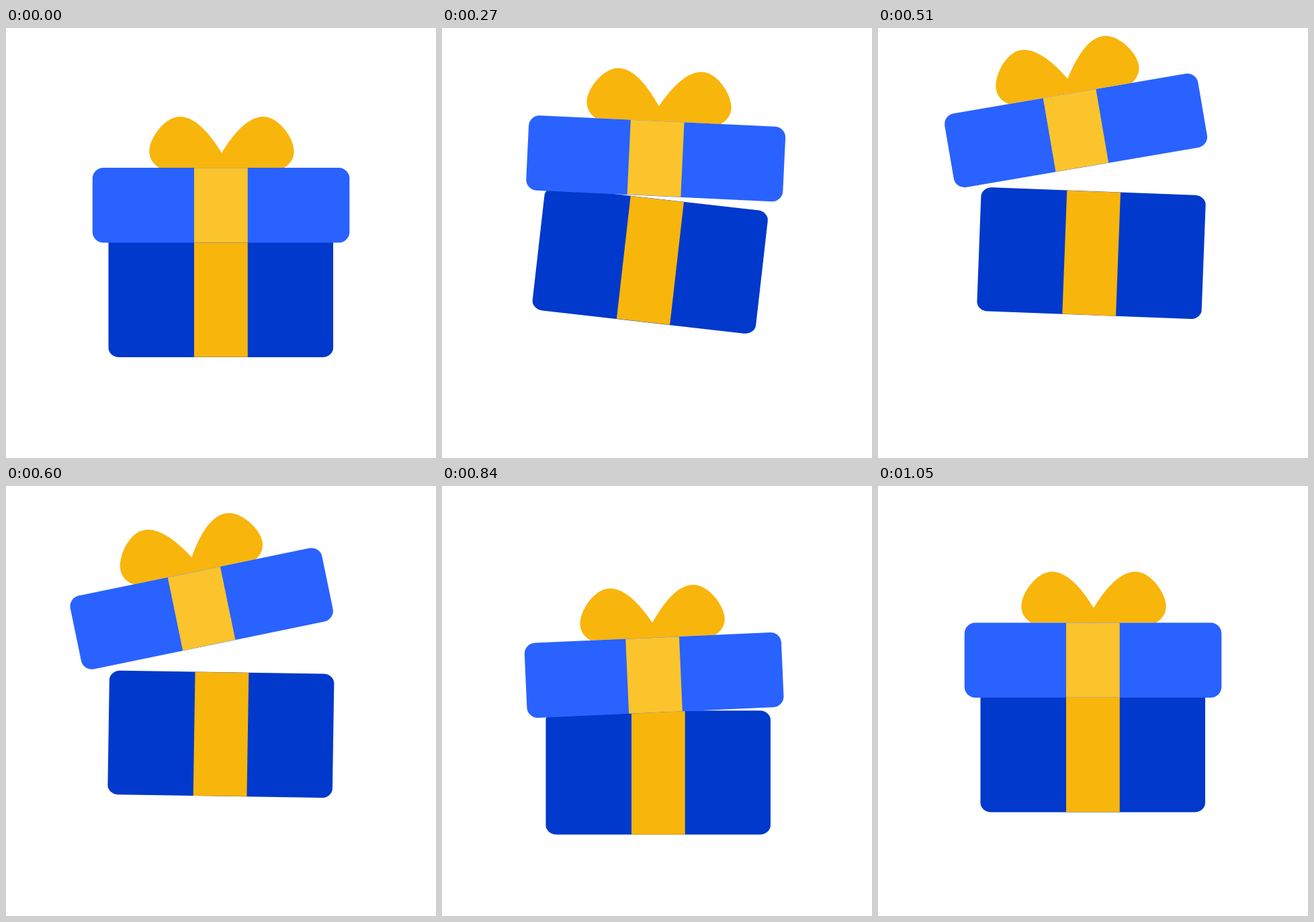
An HTML page with a canvas that plays this animation: 640 px wide and 640 px high, repeating every 2730 ms.

```html
<!DOCTYPE html>
<html lang="en">
<head>
<meta charset="utf-8">
<title>Gift box</title>
<style>
  html, body { margin: 0; width: 100%; height: 100%; overflow: hidden; background: #fff; }
  canvas { display: block; width: 640px; height: 640px; }
</style>
</head>
<body>
<canvas id="stage" width="640" height="640"></canvas>
<script>
const ctx = document.getElementById('stage').getContext('2d');
const LOOP = 2730, MOVE_END = 1050, STEP = 30;
const BLUE = '#2962ff', NAVY = '#0039cb', GOLD = '#f8b50c', PALE = '#fbc42d';

// Eased swing from one value to the next between two times.
// A skew above 1 makes the swing quick at first and slow at the end.
function swing(t, t0, t1, from, to, skew = 1) {
  const u = Math.min(1, Math.max(0, (t - t0) / (t1 - t0)));
  const s = 1 - (1 - u) ** skew;
  return from + (to - from) * s * s * (3 - 2 * s);
}

// The body hangs from the middle of its top edge.
function bodyPose(t) {
  return {
    x: t < 860 ? swing(t, 0, 860, 319.75, 321.75) : swing(t, 860, MOVE_END, 321.75, 319.75),
    y: t < 432 ? swing(t, 0, 432, 305.5, 230.5)
      : t < 798 ? swing(t, 432, 798, 230.5, 337)
      : swing(t, 798, MOVE_END, 337, 301),
    turn: t < 240 ? swing(t, 0, 240, 0, 6.6, 1.1) : swing(t, 240, 840, 6.6, 0, 1.6)
  };
}

// The lid turns about the middle of its bottom edge.
function lidPose(t) {
  return {
    x: t < 600 ? swing(t, 110, 600, 320, 302.4) : swing(t, 600, 900, 302.4, 320),
    y: t < 463 ? swing(t, 20, 463, 319.5, 202.7)
      : t < 885 ? swing(t, 463, 885, 202.7, 341.5)
      : swing(t, 885, MOVE_END, 341.5, 315),
    turn: t < 182 ? swing(t, 0, 182, 0, 4.55)
      : t < 600 ? swing(t, 182, 600, 4.55, -11.65)
      : swing(t, 600, 944, -11.65, 0)
  };
}

function place(pose, draw) {
  ctx.save();
  ctx.translate(pose.x, pose.y);
  ctx.rotate(pose.turn * Math.PI / 180);
  draw();
  ctx.restore();
}

function box(x, y, w, h, radius, color) {
  ctx.fillStyle = color;
  ctx.beginPath();
  ctx.roundRect(x, y, w, h, radius);
  ctx.fill();
}

function drawBody() {
  box(-167.25, 0, 334.5, 184.5, { x: 16, y: 14 }, NAVY);
  box(-39.75, 0.2, 79.75, 184.1, 0, GOLD);
}

function drawBow() {
  ctx.fillStyle = GOLD;
  for (const side of [-1, 1]) {
    ctx.save();
    ctx.translate(1, -111.5);
    ctx.scale(side, 1);
    ctx.beginPath();
    ctx.moveTo(-0.5, -22);
    ctx.lineTo(0, -22);
    ctx.bezierCurveTo(17, -50, 39, -76, 62, -76);
    ctx.bezierCurveTo(85, -76, 107.7, -44, 107.7, -24.5);
    ctx.bezierCurveTo(107.7, -14, 102, -5.5, 93, 0);
    ctx.lineTo(-0.5, 0);
    ctx.fill();
    ctx.restore();
  }
}

function drawLid() {
  drawBow();
  box(-191.25, -111.5, 382.5, 111.5, 16, BLUE);
  box(-40, -111.3, 79.75, 111.1, 0, PALE);
}

function render(now) {
  const t = Math.min(MOVE_END, Math.floor(now % LOOP / STEP) * STEP);
  ctx.fillStyle = '#fff';
  ctx.fillRect(0, 0, 640, 640);
  place(bodyPose(t), drawBody);
  place(lidPose(t), drawLid);
}

const start = performance.now();
function tick() {
  render(performance.now() - start);
  requestAnimationFrame(tick);
}
tick();
</script>
</body>
</html>
```
